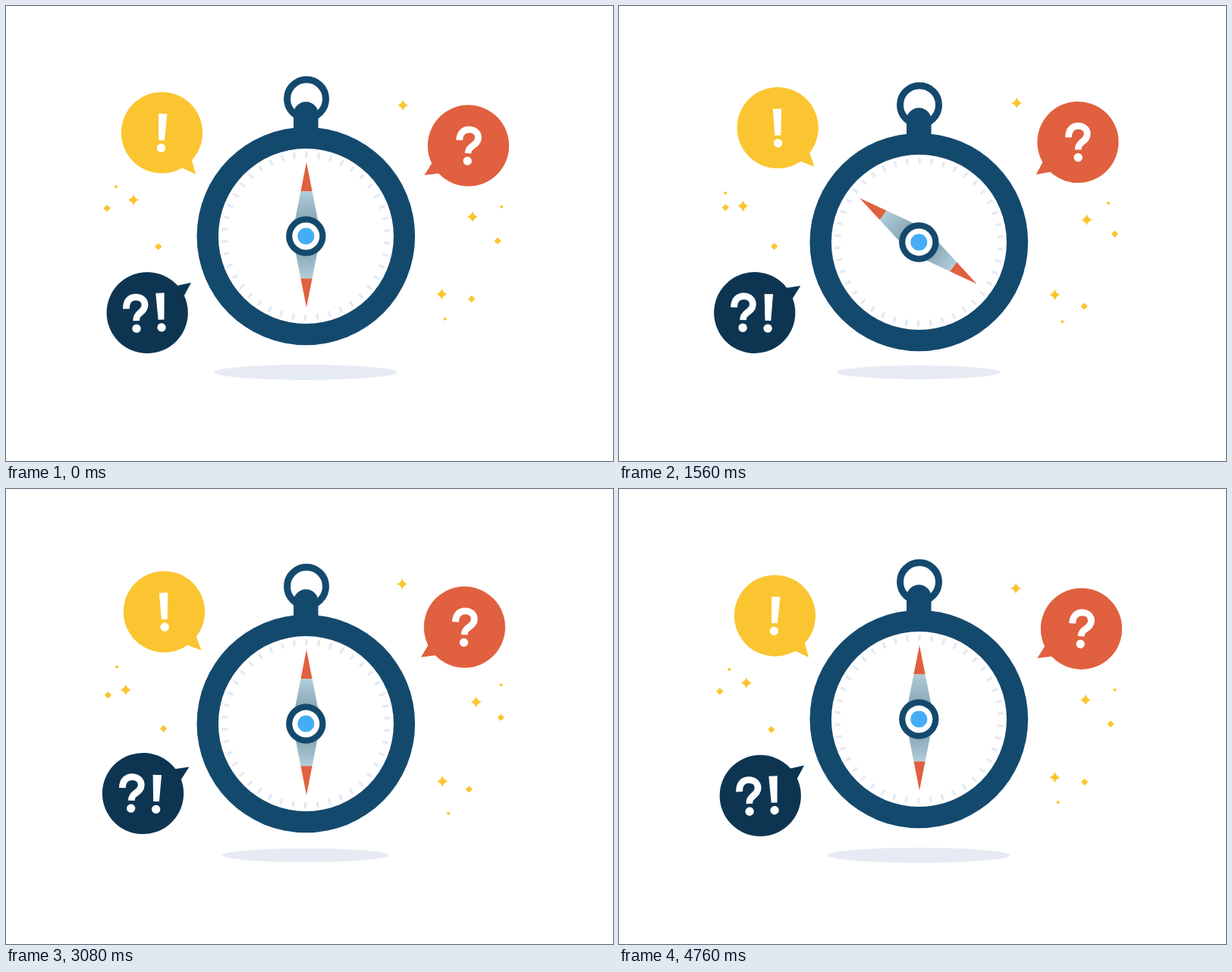
Recreate the animation shown at these times as an HTML page with a canvas. Size 800x600 px, loop 4800 ms.

```html
<!DOCTYPE html>
<html lang="en">
<head>
<meta charset="utf-8">
<title>Compass and questions</title>
<style>
  html, body { margin: 0; width: 100%; height: 100%; overflow: hidden; background: #fff; }
  canvas { display: block; width: 800px; height: 600px; }
</style>
</head>
<body>
<canvas id="stage" width="800" height="600"></canvas>
<script>
const ctx = document.getElementById('stage').getContext('2d');
const LOOP = 4800, BOB = 2400, TAU = Math.PI * 2, DEG = Math.PI / 180;
const BLUE = '#14496e', NAVY = '#0d3552', RED = '#e0603f', YELLOW = '#fbc531',
      PALE = '#e6eaf2', SKY = '#45adf5', WHITE = '#fff';

// Drift orbits: [centre x, cos, sin, centre y, cos, sin]
const SPARKLES = [
  { shape: dot, orbit: [144, 1.2, -3.68, 239.5, -1.3, 7.34] },
  { shape: diamond, orbit: [135.7, -2.6, 3.88, 268.1, -1.42, -3.45] },
  { shape: star, orbit: [163.1, 4.92, 2.9, 261.3, -5.65, -0.05] },
  { shape: diamond, orbit: [204.3, -3.51, -1.4, 316.7, 0.55, 0.58] },
  { shape: star, orbit: [523.1, 0, 1.24, 128.2, 2.87, 1.32] },
  { shape: star, orbit: [617, -2.15, -1.67, 280.15, -2.08, 0.9] },
  { shape: dot, orbit: [650.5, 2.61, -4.85, 261.1, 3.68, 0.56] },
  { shape: diamond, orbit: [651.1, -3.06, 1.03, 304.1, 5.68, -1] },
  { shape: star, orbit: [574.6, -0.3, -0.43, 382.1, -2.03, -2.58] },
  { shape: diamond, orbit: [612.35, 1.33, 1.66, 392.6, -6.2, 0.65] },
  { shape: dot, orbit: [581.9, -3.31, 1.13, 419, -6.19, -6.3] }
];

// sway: rotation in degrees [cos, sin], measured from the pose at time zero
const BUBBLES = [
  { color: YELLOW, orbit: [207.6, -2.11, 0.62, 163.3, 3.69, -1.09], sway: [3, 0],
    tail: [26.5, 46.3, 44.5, 55, 39.2, 35.5], tilt: 2.9, marks: [[bang, 0]] },
  { color: RED, orbit: [606.3, 3.1, 0, 182.1, 2.1, -1.8], sway: [1.5, -2.1],
    tail: [-47.8, 22.5, -58, 38.8, -38.5, 36.5], tilt: 3.4, marks: [[question, 0]] },
  { color: NAVY, orbit: [182, 4.2, -1.5, 403.4, 0.6, 1.84], wobble: 0.5, sway: [-2.9, 0],
    tail: [37.5, -35.3, 57.8, -39.8, 48.2, -21.8], tilt: -2.6,
    marks: [[question, -15.1], [bang, 17.9]] }
];

function at(x, y, angle, draw) {
  ctx.save();
  ctx.translate(x, y);
  ctx.rotate(angle);
  draw();
  ctx.restore();
}

function disc(x, y, r, color) {
  ctx.fillStyle = color;
  ctx.beginPath();
  ctx.arc(x, y, r, 0, TAU);
  ctx.fill();
}

function polygon(points, color) {
  ctx.fillStyle = color;
  ctx.beginPath();
  for (let i = 0; i < points.length; i += 2) ctx.lineTo(points[i], points[i + 1]);
  ctx.closePath();
  ctx.fill();
}

function orbitPoint([x, xc, xs, y, yc, ys], phase) {
  const c = Math.cos(phase), s = Math.sin(phase);
  return [x + xc * c + xs * s, y + yc * c + ys * s];
}

const smooth = u => {
  const v = Math.min(1, Math.max(0, u));
  return v * v * (3 - 2 * v);
};

function star() {
  const r = 7.3, k = 1.7;
  ctx.beginPath();
  ctx.moveTo(0, -r);
  ctx.quadraticCurveTo(k, -k, r, 0);
  ctx.quadraticCurveTo(k, k, 0, r);
  ctx.quadraticCurveTo(-k, k, -r, 0);
  ctx.quadraticCurveTo(-k, -k, 0, -r);
  ctx.fill();
}

function roundedSquare(half, radius) {
  ctx.rotate(Math.PI / 4);
  ctx.beginPath();
  ctx.roundRect(-half, -half, half * 2, half * 2, radius);
  ctx.fill();
}

function diamond() { roundedSquare(3.3, 0.9); }

function dot() { roundedSquare(1.85, 1.2); }

function bang() {
  polygon([-5.7, -25.1, 5.7, -25.1, 3.9, 10, -3.9, 10], WHITE);
  disc(0, 20.2, 5.7, WHITE);
}

function question() {
  ctx.strokeStyle = WHITE;
  ctx.lineWidth = 8.8;
  ctx.beginPath();
  ctx.moveTo(-12.3, -6.4);
  ctx.bezierCurveTo(-12.3, -16.5, -7, -21.4, 0.3, -21.4);
  ctx.bezierCurveTo(7.5, -21.4, 12.4, -17, 12.4, -10.6);
  ctx.bezierCurveTo(12.4, -5.5, 9, -2.8, 5.4, 0);
  ctx.bezierCurveTo(1.5, 3, 0.2, 5, 0.2, 10);
  ctx.stroke();
  disc(0, 20.2, 5.7, WHITE);
}

function drawBubble({ color, orbit, wobble = 0, sway, tail, tilt, marks }, phase) {
  const [x, y] = orbitPoint(orbit, phase);
  const angle = sway[0] * (Math.cos(phase) - 1) + sway[1] * Math.sin(phase);
  at(x, y + wobble * Math.cos(phase * 2), angle * DEG, () => {
    disc(0, 0, 53.6, color);
    polygon([0, 0, ...tail], color);
    ctx.rotate(tilt * DEG);
    for (const [mark, offset] of marks) at(offset, 0, 0, mark);
  });
}

function drawShadow(t) {
  const scale = 1 - 0.12 * Math.abs(Math.sin(Math.PI * t / BOB));
  ctx.fillStyle = PALE;
  ctx.beginPath();
  ctx.ellipse(394.9, 483, 120.75 * scale, 10 * scale, 0, 0, TAU);
  ctx.fill();
}

function needleHalf(length, dir) {
  const slope = 0.197, capY = (length - 38.3) * dir, half = length * slope, capHalf = 38.3 * slope;
  const metal = ctx.createLinearGradient(0, 20 * dir, 0, capY);
  metal.addColorStop(0, '#88a6b4');
  metal.addColorStop(1, '#b0ced9');
  polygon([-half, 0, -capHalf, capY, capHalf, capY, half, 0], metal);
  polygon([-capHalf, capY, 0, length * dir, capHalf, capY], RED);
}

function needleAngle(t) {
  return -60 * DEG * (smooth(t / 1280) - smooth((t - 1338) / 1115));
}

function drawCompass(t) {
  const y = 303.5 + 5 * (1 - Math.cos(TAU * t / BOB));
  at(395.3, y, 0, () => {
    ctx.strokeStyle = BLUE;
    ctx.lineWidth = 9;
    ctx.beginPath();
    ctx.arc(0.7, -181, 25.5, 0, TAU);
    ctx.stroke();
    ctx.fillStyle = BLUE;
    ctx.beginPath();
    ctx.roundRect(-16.3, -177.3, 32.5, 60, [16.25, 16.25, 0, 0]);
    ctx.fill();
    disc(0, 0, 143.8, BLUE);
    disc(0.1, 0, 115.5, WHITE);

    ctx.fillStyle = PALE;
    for (let i = 0; i < 42; i++) {
      at(0, 0, i / 42 * TAU + 0.4 * DEG, () => ctx.fillRect(-1.7, -111.4, 3.4, 8));
    }

    at(0, 0, needleAngle(t), () => {
      ctx.translate(0.7, 0);
      needleHalf(97.5, -1);
      needleHalf(94, 1);
    });
    disc(0, 0, 26.2, BLUE);
    disc(0, 0, 18, WHITE);
    disc(0, 0, 11, SKY);
  });
}

function render(t) {
  const phase = TAU * t / LOOP;
  ctx.fillStyle = WHITE;
  ctx.fillRect(0, 0, 800, 600);
  drawShadow(t);
  drawCompass(t);
  for (const { shape, orbit } of SPARKLES) {
    const [x, y] = orbitPoint(orbit, phase);
    ctx.fillStyle = YELLOW;
    at(x, y, 0, shape);
  }
  for (const bubble of BUBBLES) drawBubble(bubble, phase);
}

const start = performance.now();
function tick() {
  render((performance.now() - start) % LOOP);
  requestAnimationFrame(tick);
}
tick();
</script>
</body>
</html>
```
